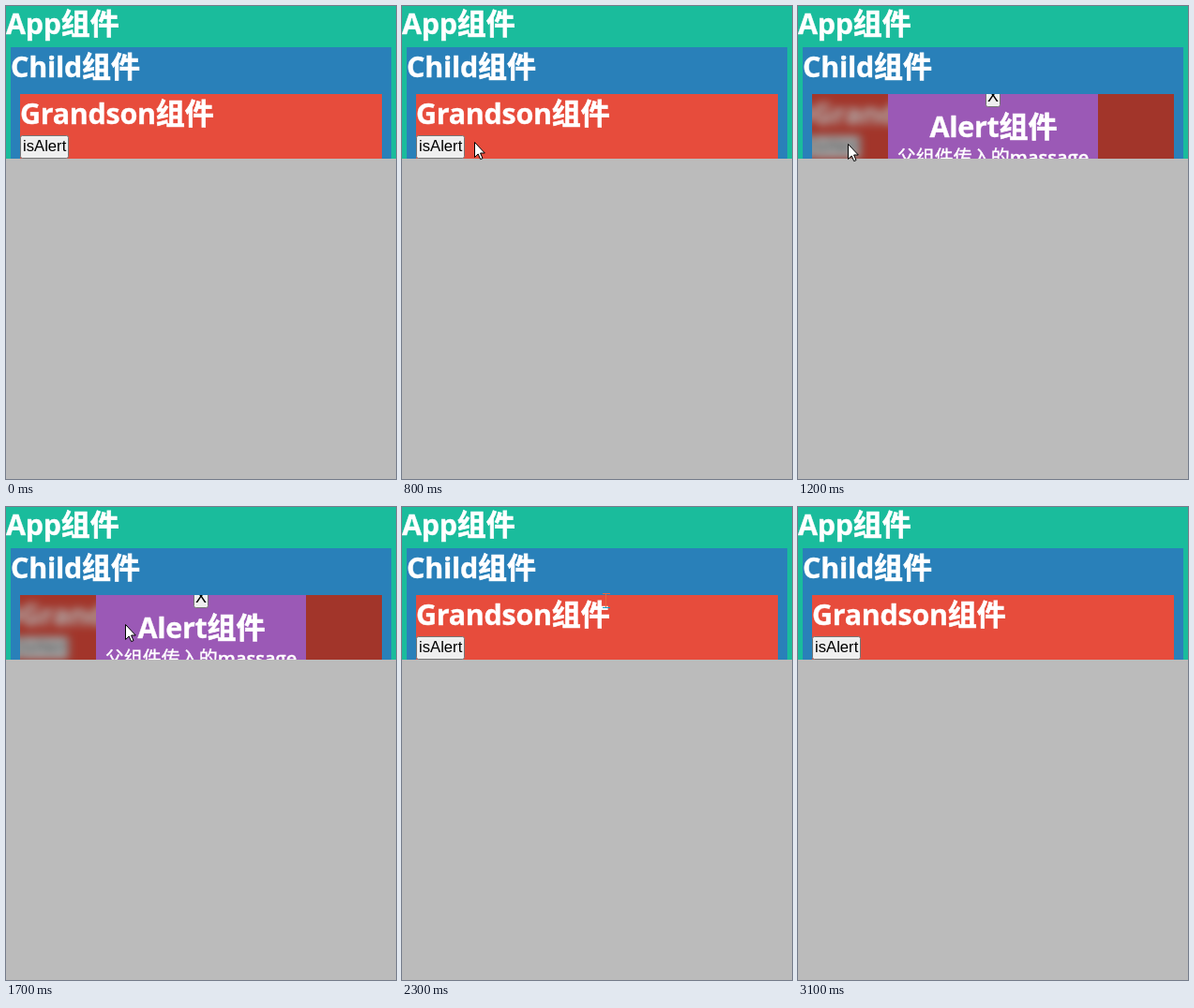
An HTML page that plays this animation: 416 by 505 pixels, repeating every 3200 ms.

```html
<!DOCTYPE html>
<html lang="zh">
<head>
<meta charset="utf-8">
<style>
  html, body { margin: 0; width: 100%; height: 100%; overflow: hidden; background: #bbb; }
  svg { display: block; }
  .title { font: bold 30.5px "Open Sans", "Noto Sans CJK SC", "Noto Sans CJK", sans-serif; letter-spacing: -.3px; fill: #fff; stroke: #fff; stroke-width: .4; }
  .cjk { font-family: "Noto Sans CJK SC", "Noto Sans CJK", sans-serif; font-size: 31px; letter-spacing: 0; stroke-width: .7; }
  .note { font-size: 20px; font-weight: 600; letter-spacing: 0; }
  .note .cjk { font-size: 20px; font-weight: 400; stroke-width: .4; }
  .label { font: 16.67px "Liberation Sans", Arial, sans-serif; }
  .cross { font-size: 18px; }
  .button { fill: #efefef; stroke: #767676; }
  .invert { mix-blend-mode: difference; fill: #fff; }
</style>
</head>
<body>
<svg width="416" height="505" viewBox="0 0 416 505">
  <defs>
    <clipPath id="inner"><rect x="15" y="94" width="386" height="69"/></clipPath>
    <filter id="blur" filterUnits="userSpaceOnUse" x="-40" y="80" width="460" height="100">
      <feGaussianBlur stdDeviation="5"/>
    </filter>
    <g id="content">
      <text class="title" x="15" y="126">Grandson<tspan class="cjk">组件</tspan></text>
      <rect id="open" class="button" x="15.5" y="138.5" width="51" height="24" rx="2"/>
      <text class="label" x="18" y="155">isAlert</text>
    </g>
  </defs>

  <rect width="416" height="163" fill="#1abc9c"/>
  <text class="title" x="0" y="30">App<tspan class="cjk">组件</tspan></text>
  <rect x="5" y="44" width="406" height="119" fill="#2980b9"/>
  <text class="title" x="5" y="76">Child<tspan class="cjk">组件</tspan></text>
  <rect x="15" y="94" width="386" height="69" fill="#e74c3c"/>
  <use id="plain" href="#content"/>

  <g id="alert" clip-path="url(#inner)">
    <!-- the mirrored copy lets the blur reflect at the left edge -->
    <g filter="url(#blur)">
      <use href="#content"/>
      <use href="#content" transform="translate(30) scale(-1 1)"/>
    </g>
    <rect x="15" y="94" width="386" height="69" opacity=".3"/>
    <rect x="96" y="94" width="224" height="69" fill="#9b59b6"/>
    <rect id="close" class="button" x="200.5" y="84.5" width="15" height="23" rx="2"/>
    <text class="label cross" x="208" y="101.5" text-anchor="middle">X</text>
    <text class="title" x="208.5" y="140" text-anchor="middle">Alert<tspan class="cjk">组件</tspan></text>
    <text class="title note" x="208" y="169" text-anchor="middle"><tspan class="cjk">父组件传入的</tspan>massage</text>
  </g>

  <path id="arrow" d="M-.5 .5V16.5L3.2 13L5.7 18.6L8 17.6L5.6 12H10.3Z" fill="#fff" stroke="#000"/>
  <g id="beam">
    <path d="M-3 -7.5H5M.5 -7V7M-3 7.5H5" fill="none" stroke="#e8663c"/>
    <rect id="bar" class="invert" x="-3" width="8" height="1"/>
  </g>
</svg>
<script>
const $ = id => document.getElementById(id);
const show = (el, on) => el.style.display = on ? "" : "none";
const LOOP = 3200, STEP = 100;

// pointer path: time, x, y
const path = [
  [200, 363, 80], [300, 292, 103], [400, 221, 128], [500, 160, 138], [600, 114, 142],
  [700, 90, 143], [800, 78, 145], [1100, 54, 147], [1400, 54, 147], [1500, 64, 144],
  [1700, 128, 125], [1900, 207, 107], [2000, 225, 104], [2100, 219, 102],
  [2200, 216, 100], [2300, 217, 100], [2400, 300, 122]
];

function pointer(t) {
  if (t < path[0][0] || t > path.at(-1)[0]) return null;
  const i = Math.max(1, path.findIndex(p => p[0] >= t));
  const [a, b] = [path[i - 1], path[i]];
  const k = (t - a[0]) / (b[0] - a[0]);
  return [1, 2].map(n => Math.round(a[n] + (b[n] - a[n]) * k));
}

function draw(now) {
  const t = Math.floor(now % LOOP / STEP) * STEP;
  const open = t >= 1200 && t < 2300;
  const [x, y] = pointer(t) || [-99, -99];
  const text = !open && x > 15 && x < 224 && y > 96 && y < 136;
  const over = !open && x > 15 && x < 67 && y > 138;

  show($("plain"), !open);
  show($("alert"), open);
  show($("arrow"), !text);
  show($("beam"), text);
  $("open").style.fill = over ? (t === 1100 ? "#f5f5f5" : "#e5e5e5") : "#efefef";
  $("close").style.fill = open && x > 201 && x < 217 && y < 108 ? "#e5e5e5" : "#efefef";
  $("arrow").setAttribute("transform", `translate(${x} ${y})`);
  $("beam").setAttribute("transform", `translate(${x} ${y})`);
  $("bar").setAttribute("y", y > 110 ? -8 : 7);
}

const start = performance.now();
function tick(now) {
  draw(Math.max(0, now - start));
  requestAnimationFrame(tick);
}
requestAnimationFrame(tick);
</script>
</body>
</html>
```
